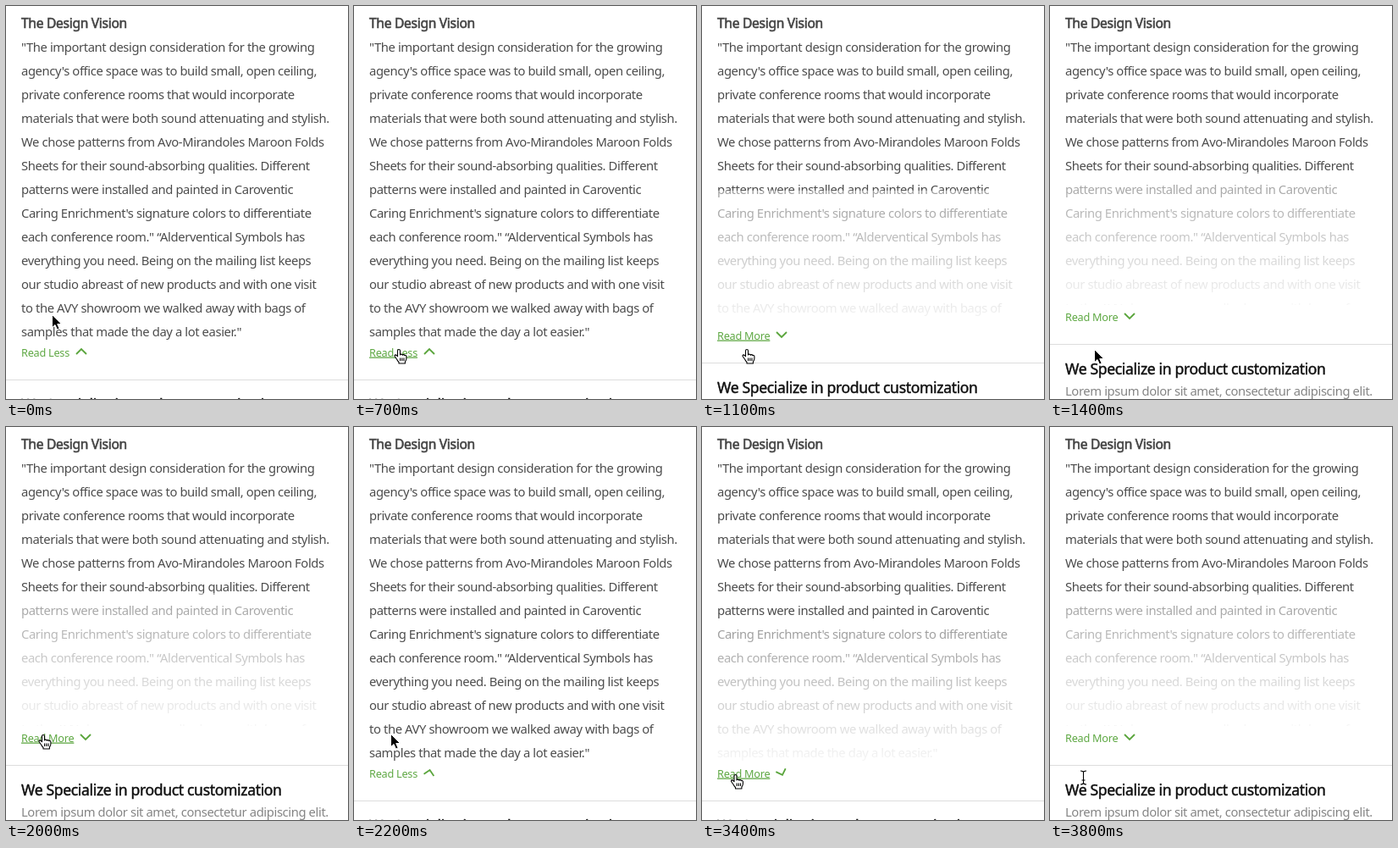
An HTML page that plays this animation: 404 px wide and 464 px high, repeating every 3.9 s.

```html
<!DOCTYPE html>
<html lang="en">
<head>
<meta charset="utf-8">
<title>Read more panel</title>
<style>
  html, body { margin: 0; width: 100%; height: 100%; overflow: hidden; background: #fff; }
  svg { display: block; width: 404px; height: 464px; font-family: "Noto Sans", "Open Sans", sans-serif; }
  .title { font-size: 15.6px; letter-spacing: -.3px; fill: #444; stroke: #444; stroke-width: .6; }
  .body { font-size: 14.8px; letter-spacing: -.4px; fill: #4c4c4c; }
  .head { font-size: 17.6px; letter-spacing: -.36px; fill: #111; stroke: #111; stroke-width: .45; }
  .sub { fill: #858585; }
  .link { font-size: 12.7px; letter-spacing: -.25px; fill: #5ea843; }
  .link.hover { text-decoration: underline; }
  .chevron { fill: none; stroke: #5aa53c; stroke-width: 1.8; }
</style>
</head>
<body>
<svg viewBox="0 0 404 464">
  <defs>
    <linearGradient id="veil" x1="0" y1="0" x2="0" y2="1">
      <stop offset="0" stop-color="#fff" stop-opacity=".45"/>
      <stop offset="1" stop-color="#fff" stop-opacity=".95"/>
    </linearGradient>
  </defs>
  <text class="title" x="18" y="25.5">The Design Vision</text>
  <g id="copy" class="body"></g>
  <g id="lower">
    <rect id="fade" y="238" width="404" height="157" fill="url(#veil)"/>
    <rect y="395" width="404" height="150" fill="#fff"/>
    <text id="link" class="link" x="18" y="413.5"></text>
    <path id="chevron" class="chevron" d="M-6 -3L0 3L6 -3"/>
    <rect y="441" width="404" height="1" fill="#ddd"/>
    <text class="head" x="18" y="476.5">We Specialize in product customization</text>
    <text class="body sub" x="18" y="502">Lorem ipsum dolor sit amet, consectetur adipiscing elit.</text>
  </g>
  <g id="cursor">
    <path id="arrow" d="M-.5 -1.5V13.7L3 10.5L5.5 16.1L8.1 14.9L5.7 9.5H10.5Z" fill="#000" stroke="#fff"/>
    <g id="hand" stroke="#000" stroke-width="1.1" stroke-linejoin="round">
      <path fill="#fff" d="M-1.5 0a1.5 1.5 0 0 1 3 0V5c.3-1.3 2.6-1.2 2.8.3c.4-1 2.4-.9 2.6.5c.5-.8 2-.4 2 1V9q0 2.5-1.5 4V15H0v-1.5q-1.5-1.5-2.5-3.5l-2.3-3.2q-.8-1.8 1-1.9q1.2.2 2.3 1.8z"/>
      <path d="M1.6 8.5v3.5M3.8 8.5v3.5M6 8.5v3.5"/>
    </g>
    <g id="beam" fill="none">
      <path stroke="#fff" stroke-width="2.6" d="M-3.5 -7Q0 -7 0 -5V7Q0 9 -3.5 9M3.5 -7Q0 -7 0 -5V7Q0 9 3.5 9M-2 4H2"/>
      <path stroke="#000" stroke-width="1.1" d="M-3.5 -7Q0 -7 0 -5V7Q0 9 -3.5 9M3.5 -7Q0 -7 0 -5V7Q0 9 3.5 9M-2 4H2"/>
    </g>
  </g>
</svg>
<script>
const LOOP = 3900, STEP = 100, FOLD = 42;
const lines = [
  '"The important design consideration for the growing',
  "agency's office space was to build small, open ceiling,",
  'private conference rooms that would incorporate',
  'materials that were both sound attenuating and stylish.',
  'We chose patterns from Avo-Mirandoles Maroon Folds',
  'Sheets for their sound-absorbing qualities. Different',
  'patterns were installed and painted in Caroventic',
  "Caring Enrichment's signature colors to differentiate",
  'each conference room." “Alderventical Symbols has',
  'everything you need. Being on the mailing list keeps',
  'our studio abreast of new products and with one visit',
  'to the AVY showroom we walked away with bags of',
  'samples that made the day a lot easier."'
];
// pointer path: time, x, y
const path = [
  [0, 55, 366], [100, 55, 366], [400, 52, 412], [500, 52, 416], [600, 53, 411],
  [700, 53, 407], [1500, 53, 407], [2000, 44, 365], [2200, 44, 364],
  [2600, 60, 408], [2900, 60, 408], [3100, 45, 415], [3200, 45, 415],
  [3400, 39.5, 412], [3700, 39.5, 412], [3800, 39.5, 413]
];

const $ = id => document.getElementById(id);
const show = (id, on) => { $(id).style.display = on ? '' : 'none'; };
const within = (t, a, b) => t >= a && t < b;

function ease(t, from, to) {
  const u = Math.min(1, Math.max(0, (t - from) / (to - from)));
  return u * u * (3 - 2 * u);
}

function pointer(t) {
  const i = path.findIndex(k => k[0] > t);
  if (i < 0) return path[path.length - 1].slice(1);
  const [t0, x0, y0] = path[i - 1], [t1, x1, y1] = path[i];
  const u = (t - t0) / (t1 - t0);
  return [x0 + (x1 - x0) * u, y0 + (y1 - y0) * u];
}

function draw(t) {
  const folded = within(t, 900, 2100) || t >= 3300;
  const hover = within(t, 400, 1400) || within(t, 1900, 2200) || within(t, 2600, 3800);
  const slide = t < 2100 ? ease(t, 1005, 1200) : ease(t, 3405, 3600);
  const shift = Math.round(FOLD * slide);
  const turn = ease(t, 840, 1040) - ease(t, 2030, 2230) + ease(t, 3240, 3440);

  $('lower').setAttribute('transform', `translate(0 ${-shift})`);
  show('fade', within(t, 900, 2200) || t >= 3300);

  $('link').textContent = folded ? 'Read More' : 'Read Less';
  $('link').classList.toggle('hover', hover);
  $('chevron').setAttribute('transform',
    `translate(${folded ? 94 : 89} 408) rotate(${-180 * (1 - turn)})`);

  const [x, y] = pointer(t);
  $('cursor').setAttribute('transform', `translate(${x} ${y})`);
  const beam = t >= 3800;
  show('beam', beam);
  show('hand', hover);
  show('arrow', !hover && !beam);
}

$('copy').innerHTML = lines.map((s, i) => `<text x="18" y="${54 + 28 * i}">${s}</text>`).join('');

const start = performance.now();
function tick() {
  const t = (performance.now() - start) % LOOP;
  draw(Math.floor(t / STEP) * STEP);
  requestAnimationFrame(tick);
}
draw(0);
requestAnimationFrame(tick);
</script>
</body>
</html>
```
